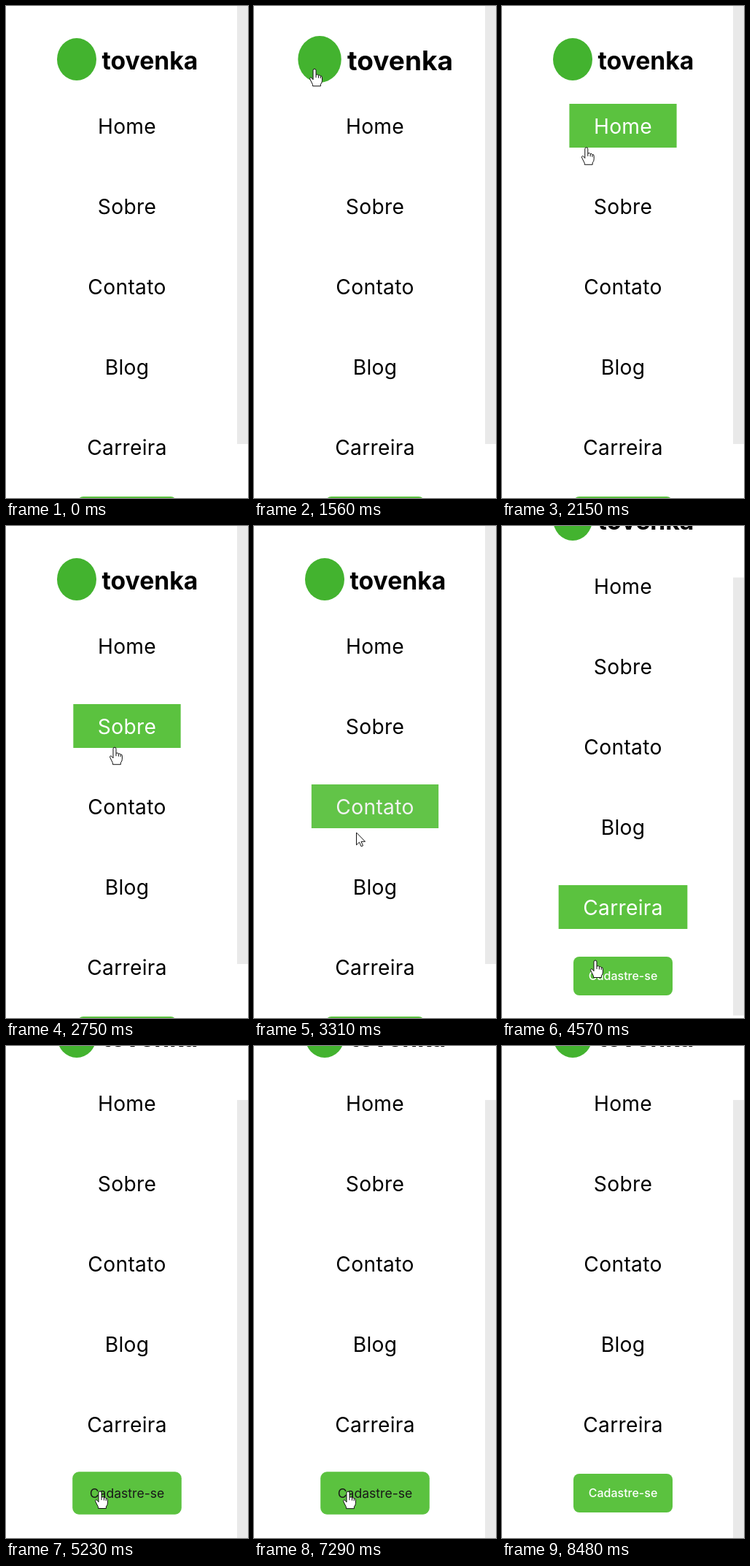
An HTML page for the animation above (8.54 s loop, 332 px wide and 674 px high).

```html
<!DOCTYPE html>
<html lang="pt">
<head>
<meta charset="utf-8">
<title>Menu</title>
<style>
  html, body { margin: 0; width: 100%; height: 100%; overflow: hidden; background: #fff; }
  svg { display: block; width: 332px; height: 674px; }
  text { font-family: Inter, "Open Sans", sans-serif; }
  .link { font-size: 28.2px; letter-spacing: .3px; text-anchor: middle; }
  .brand { font-size: 33.7px; font-weight: 700; }
  .label { font-size: 16px; font-weight: 500; text-anchor: middle; }
  #cursor { fill: #fff; stroke: #111; stroke-linejoin: round; }
</style>
</head>
<body>
<svg viewBox="0 0 332 674">
  <rect id="thumb" x="317" width="15" height="600" fill="#e9e9e9"/>
  <g id="page">
    <g id="logo">
      <ellipse cx="97" cy="73" rx="27" ry="29" fill="#43b32f"/>
      <text class="brand" x="131.5" y="87">tovenka</text>
    </g>
    <g id="links"></g>
    <g id="button">
      <rect x="98" y="672" width="136" height="53" rx="8" fill="#5bc23f"/>
      <text id="label" class="label" x="166" y="704">Cadastre-se</text>
    </g>
  </g>
  <g id="cursor">
    <path id="arrow" d="M0 0V17L4 13.2 6.6 19 9 18 6.5 12.3H12Z"/>
    <path id="hand" d="M-2 2a2 2 0 0 1 4 0V8q3-1 3.4.8 2.4-.6 2.8.9 2.2-.3 2.2 2V16q0 3-2 5V23.5H-2.5V21.5L-6 14.5q-1.2-2.5.6-2.8 1.2-.2 3.4 3ZM2 8v4M5.4 9v3.5M8.2 10v3"/>
  </g>
</svg>
<script>
const LOOP = 8540, FADE = 200, MID = 166;
const $ = id => document.getElementById(id);

// Key points of the pointer tip: time, x, y
const path = [
  [300, 338, 202], [600, 262, 135], [880, 83, 86], [1560, 83, 86],
  [2750, 149, 303], [4040, 129.5, 572], [4170, 128, 595], [4885, 128, 595],
  [5090, 129, 610], [7290, 129, 610], [7740, 142, 690]
];

function ease(k) {
  k = Math.min(1, Math.max(0, k));
  return k * k * (3 - 2 * k);
}

function pointer(t) {
  const i = path.findIndex(p => p[0] > t);
  if (i < 1) return path.at(i).slice(1);
  const [t0, x0, y0] = path[i - 1], [t1, x1, y1] = path[i];
  const k = (t - t0) / (t1 - t0);
  return [x0 + (x1 - x0) * k, y0 + (y1 - y0) * k];
}

const scrollAt = t => 82 * ease((t - 4180) / 385) + 4 * ease((t - 4880) / 100);

const target = (x, y, w, h) => ({ x, y, w, h, on: Infinity, off: Infinity });
const inside = (o, x, y) => x >= o.x && x <= o.x + o.w && y >= o.y && y <= o.y + o.h;

function add(tag, attrs) {
  const el = document.createElementNS('http://www.w3.org/2000/svg', tag);
  for (const key in attrs) el.setAttribute(key, attrs[key]);
  return $('links').appendChild(el);
}

function makeLink(name, i) {
  const y = 134 + 110 * i;
  const box = add('rect', { y, height: 60, fill: '#5bc23f' });
  const text = add('text', { class: 'link', x: MID, y: y + 41.3 });
  text.textContent = name;
  const w = text.getComputedTextLength() + 67;
  box.setAttribute('x', MID - w / 2);
  box.setAttribute('width', w);
  return { ...target(MID - w / 2, y, w, 60), box, text };
}

const logo = target(70, 44, 193, 58);
const links = ['Home', 'Sobre', 'Contato', 'Blog', 'Carreira'].map(makeLink);
const button = target(98, 672, 136, 53);
const targets = [logo, ...links, button];

// Hover is re-evaluated only while the pointer moves, not while the page scrolls.
function findHovers() {
  let hot, last = '';
  for (let t = 0; t < LOOP; t += 5) {
    const [x, y] = pointer(t);
    if (last === x + ',' + y) continue;
    last = x + ',' + y;
    const next = targets.find(o => inside(o, x, y + scrollAt(t)));
    if (next === hot) continue;
    if (hot) hot.off = t;
    if (next) next.on = t;
    hot = next;
  }
}

const hover = (o, t) => ease((t - o.on) / FADE) - ease((t - o.off) / FADE);
const grey = k => `rgb(${Array(3).fill(Math.round(255 * k))})`;

function grow(el, o, k) {
  const x = o.x + o.w / 2, y = o.y + o.h / 2;
  el.setAttribute('transform',
    `translate(${x} ${y}) scale(${1 + 0.1 * k}) translate(${-x} ${-y})`);
}

function draw(t) {
  const scroll = scrollAt(t);
  $('page').setAttribute('transform', `translate(0 ${-scroll})`);
  $('thumb').setAttribute('y', scroll * 74 / 86);

  grow($('logo'), logo, hover(logo, t));
  for (const link of links) {
    const k = hover(link, t);
    link.box.setAttribute('opacity', k);
    link.text.setAttribute('fill', grey(k));
  }
  const k = hover(button, t);
  grow($('button'), button, k);
  $('label').setAttribute('fill', grey(1 - 0.9 * k));
  $('label').style.fontWeight = k > 0.5 ? 400 : 500;

  const over = targets.some(o => t >= o.on && t < o.off);
  $('cursor').setAttribute('transform', `translate(${pointer(t)})`);
  $('hand').setAttribute('visibility', over ? 'visible' : 'hidden');
  $('arrow').setAttribute('visibility', over ? 'hidden' : 'visible');
}

findHovers();
const start = performance.now();
function tick() {
  draw((performance.now() - start) % LOOP);
  requestAnimationFrame(tick);
}
tick();
</script>
</body>
</html>
```
